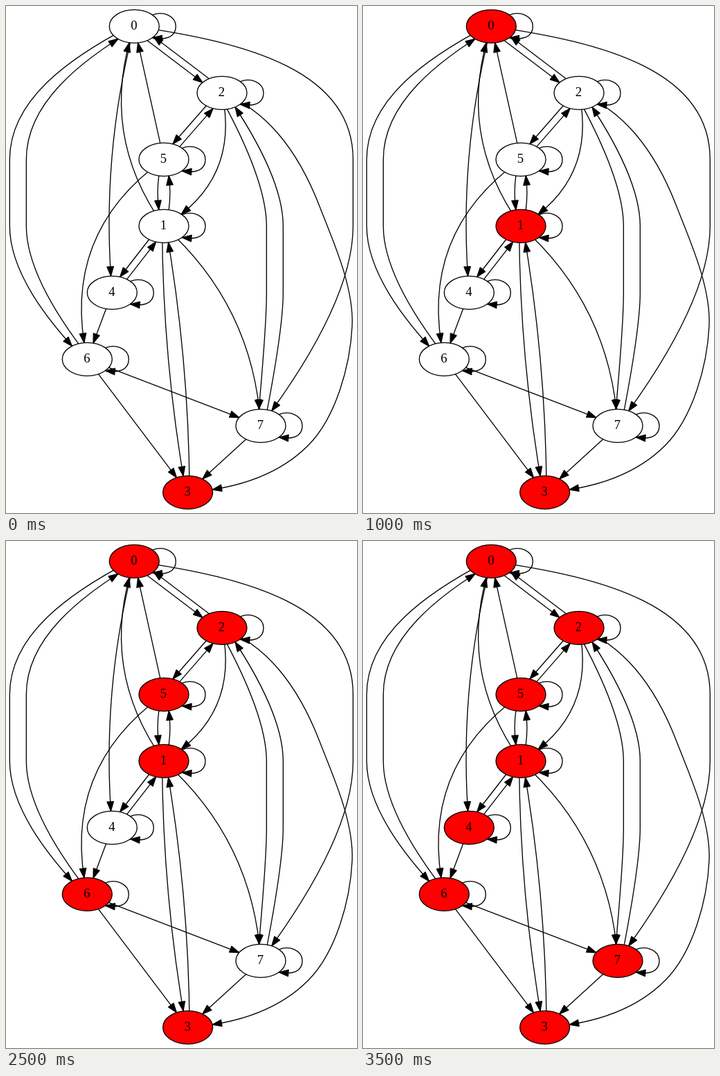
An HTML page with a canvas that plays this animation: 507 px wide and 731 px high, repeating every 4000 ms.

```html
<!DOCTYPE html>
<html lang="en">
<head>
<meta charset="utf-8">
<title>Graph traversal</title>
<style>
  html, body { margin: 0; width: 100%; height: 100%; overflow: hidden; background: #fff; }
  canvas { display: block; }
</style>
</head>
<body>
<canvas id="stage" width="507" height="731"></canvas>
<script>
const ctx = document.getElementById("stage").getContext("2d");
const STEP = 500, RX = 36, RY = 24, ARROW = 13.3, GAP = 5;
const visitOrder = [3, 1, 0, 2, 5, 6, 7, 4];

// Each rank of the layout holds one node.
const rankY = rank => 29.33 + 96 * rank;
const rankOrder = [0, 2, 5, 1, 4, 6, 7, 3];
const rankX = [185.3, 312, 228, 228, 153.3, 117.3, 368, 262.6];
const nodes = [];
rankOrder.forEach((id, rank) => nodes[id] = { id, x: rankX[rank], y: rankY(rank) });

// from, to, sideways bow
const direct = [
  [0, 2], [2, 0], [2, 5], [5, 2], [1, 4], [4, 1], [5, 0], [4, 6], [6, 7], [6, 3], [7, 3],
  [5, 1, 8.5], [1, 5, 8.5], [1, 3, 11], [3, 1, 11],
  [0, 4, 22], [1, 0, -50], [2, 1, -50], [5, 6, 68], [1, 7, -44]
];
// from, to, x of the vertical stretch, its first and last rank
const lanes = [
  [0, 6, 5.33, 2, 3], [6, 0, 29.33, 3, 2], [0, 7, 501.33, 2, 3],
  [2, 7, 376.33, 3, 4], [7, 2, 400.33, 4, 3]
];
const detour = [2, 3, [[393, 184], [453, 289], [500, 461], [437, 633]]];

const all = [...direct, ...lanes];
const hasReverse = (from, to) => all.some(([a, b]) => a === to && b === from);

// End points of an edge; opposite edges keep to their own side.
function ends(from, to, gap) {
  const a = nodes[from], b = nodes[to];
  const dx = b.x - a.x, dy = b.y - a.y, length = Math.hypot(dx, dy);
  const normal = [-dy / length, dx / length];
  const side = hasReverse(from, to) ? gap : 0;
  const shift = n => [n.x + normal[0] * side, n.y + normal[1] * side];
  return { a: shift(a), b: shift(b), normal };
}

// A path is a list of cubics, each made of four points.
function directPath([from, to, bow = 0]) {
  const { a, b, normal } = ends(from, to, bow ? GAP / 2 : GAP);
  const along = k => a.map((v, i) => v + (b[i] - v) * k + normal[i] * bow);
  return [[a, along(1 / 3), along(2 / 3), b]];
}

// Leaves the node on a slant and turns vertical at (x, y).
function turn(p, x, y) {
  const dx = x - p[0], dy = y - p[1], slant = Math.abs(dx / dy);
  return [
    p,
    [p[0] + 0.52 * dx, p[1] + (0.4 - 0.17 * slant) * dy],
    [x, y - (0.17 + 0.3 * slant) * dy],
    [x, y]
  ];
}

function lanePath([from, to, x, first, last]) {
  const { a, b } = ends(from, to, GAP);
  const enter = turn(a, x, rankY(first)), leave = turn(b, x, rankY(last)).reverse();
  return [enter, [enter[3], enter[3], leave[0], leave[0]], leave];
}

// Smooth spline through the given points with relaxed ends.
function detourPath([from, to, via]) {
  const { a, b } = ends(from, to, 0);
  const pts = [a, ...via, b], end = pts.length - 1;
  const inner = k => pts[k].map((_, i) => (pts[k + 1][i] - pts[k - 1][i]) / 2);
  const relaxed = (k, near) => inner(near).map((t, i) => 2 * Math.abs(k - near) * (k ? pts[k][i] - pts[near][i] : pts[near][i] - pts[k][i]) - t);
  const tangents = pts.map((_, k) => k === 0 ? relaxed(0, 1) : k === end ? relaxed(end, end - 1) : inner(k));
  return via.concat([b]).map((q, k) => {
    const p = pts[k];
    return [p, p.map((v, i) => v + tangents[k][i] / 3), q.map((v, i) => v - tangents[k + 1][i] / 3), q];
  });
}

function loopPath({ x, y }) {
  const at = (dx, dy) => [x + dx, y + dy];
  return [
    [at(26.5, -16.5), at(41, -22), at(60, -16), at(60, 0)],
    [at(60, 0), at(60, 16), at(45, 20), at(26.5, 16.5)]
  ];
}

function pointOn([p, c, d, q], t) {
  const u = 1 - t;
  return p.map((v, i) => u * u * u * v + 3 * u * u * t * c[i] + 3 * u * t * t * d[i] + t * t * t * q[i]);
}

// Walks back from the end of a cubic until the test holds.
function walkBack(cubic, test) {
  let t = 1, p = cubic[3];
  while (t > 0 && !test(p)) p = pointOn(cubic, t -= 0.001);
  return p;
}

function makeEdge(path, to) {
  const n = nodes[to], last = path[path.length - 1];
  const tip = walkBack(last, p => Math.hypot((p[0] - n.x) / RX, (p[1] - n.y) / RY) >= 1);
  const base = walkBack(last, p =>
    Math.hypot((p[0] - n.x) / RX, (p[1] - n.y) / RY) >= 1 &&
    Math.hypot(p[0] - tip[0], p[1] - tip[1]) >= ARROW);
  return { path, tip, base };
}

const edges = [
  ...direct.map(e => makeEdge(directPath(e), e[1])),
  ...lanes.map(e => makeEdge(lanePath(e), e[1])),
  makeEdge(detourPath(detour), detour[1]),
  ...nodes.filter(n => n.id !== 3).map(n => makeEdge(loopPath(n), n.id))
];

function drawEdge({ path, tip, base }) {
  ctx.beginPath();
  ctx.moveTo(...path[0][0]);
  for (const [, c, d, q] of path) ctx.bezierCurveTo(...c, ...d, ...q);
  ctx.stroke();

  ctx.save();
  ctx.translate(...tip);
  ctx.rotate(Math.atan2(tip[1] - base[1], tip[0] - base[0]));
  ctx.beginPath();
  ctx.moveTo(0, 0);
  ctx.lineTo(-ARROW, -4.67);
  ctx.lineTo(-ARROW, 4.67);
  ctx.closePath();
  ctx.fill();
  ctx.stroke();
  ctx.restore();
}

function drawNode({ id, x, y }, visited) {
  ctx.beginPath();
  ctx.ellipse(x, y, RX, RY, 0, 0, 2 * Math.PI);
  ctx.fillStyle = visited ? "#f00" : "#fff";
  ctx.fill();
  ctx.stroke();
  ctx.fillStyle = "#000";
  ctx.fillText(id, x - 0.5, y + 4.9);
}

function draw(now) {
  const step = Math.floor(now / STEP) % visitOrder.length;
  ctx.fillStyle = "#fff";
  ctx.fillRect(0, 0, 507, 731);
  ctx.fillStyle = ctx.strokeStyle = "#000";
  ctx.lineWidth = 1.33;
  ctx.lineJoin = "round";
  ctx.font = "18.67px 'Liberation Serif', 'Times New Roman', serif";
  ctx.textAlign = "center";
  edges.forEach(drawEdge);
  nodes.forEach(n => drawNode(n, visitOrder.indexOf(n.id) <= step));
}

const start = performance.now();
function tick() {
  draw(performance.now() - start);
  requestAnimationFrame(tick);
}
tick();
</script>
</body>
</html>
```
